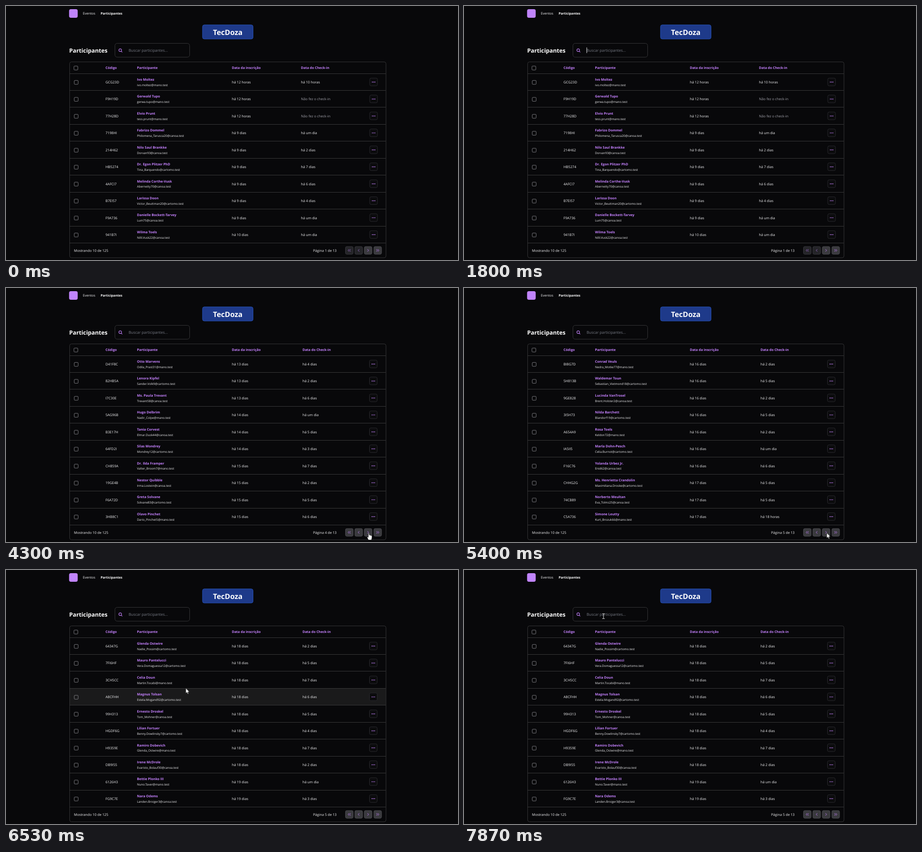
Animation, 998 px wide and 561 px high, one loop 8000 ms. Source, as an HTML page:

```html
<!DOCTYPE html>
<html lang="pt-BR">
<head>
<meta charset="utf-8">
<title>Participantes</title>
<style>
  html, body { margin: 0; width: 100%; height: 100%; overflow: hidden; background: #08080a; }
  svg { display: block; width: 998px; height: 561px; overflow: hidden; }
  text {
    font: 500 7.65px "Open Sans", "Noto Sans", sans-serif;
    fill: #f1f1f3;
    text-rendering: geometricPrecision;
    white-space: pre;
  }
  .head, .name { font-size: 7.4px; font-weight: 700; fill: #c682ff; }
  .mail { font-size: 6.55px; }
  .dim { fill: #a1a1aa; }
  .nav { font-size: 7.5px; }
  .on { font-size: 7.2px; font-weight: 700; fill: #fff; }
  .hint { font-size: 8.4px; font-weight: 400; fill: #7a7e88; }
  .h1 { font-size: 12.7px; font-weight: 700; fill: #fff; }
  .event { font-size: 16.1px; font-weight: 700; fill: #fff; text-anchor: middle; }
  .line { fill: #3a3a3b; }
  .frame { fill: none; stroke: #363638; }
  .check { fill: none; stroke: #8c8c90; stroke-width: .9; }
  .menu { fill: #0b0b0d; stroke: #2b2b2f; }
  .btn { fill: #3a3a3e; stroke: #4a4a4f; }
  .off .btn { fill: #242428; stroke: #3a3a3f; }
  .icon { fill: none; stroke: #c682ff; stroke-width: .9; stroke-linecap: round; stroke-linejoin: round; }
  .off .icon { stroke: #a571da; }
  .dots { fill: #c682ff; }

  /* Every state lives on a strip; one step of the strip shows the next state. */
  #pages, #pager, #hover, #caret, #place, #shape { animation: 8s step-end -8ms infinite; }
  #pages { animation-name: pages; }
  #pager { animation-name: pager; }
  #hover { animation-name: hover; }
  #caret { animation-name: caret; }
  #place { animation-name: place; }
  #shape { animation-name: shape; }

  @keyframes pages {
    0% { transform: translateY(0); }
    29.125% { transform: translateY(-600px); }
    42.875% { transform: translateY(-1200px); }
    57.125% { transform: translateY(-1800px); }
    70.375%, 100% { transform: translateY(-2400px); }
  }
  @keyframes pager {
    0% { transform: translateY(0); }
    25.875% { transform: translateY(-600px); }
    40.375% { transform: translateY(-1200px); }
    53.375% { transform: translateY(-1800px); }
    67.5%, 100% { transform: translateY(-2400px); }
  }
  @keyframes hover {
    0%, 9.125%, 85.63%, 100% { transform: translateY(600px); }
    6.625% { transform: translateY(299.6px); }
    8.375%, 77.69% { transform: translateY(337.05px); }
    78.53% { transform: translateY(299.6px); }
    79.09% { transform: translateY(262.15px); }
    79.68% { transform: translateY(224.7px); }
    80.3% { transform: translateY(187.25px); }
    80.93% { transform: translateY(149.8px); }
    81.54% { transform: translateY(112.35px); }
    82.5% { transform: translateY(74.9px); }
    83.63% { transform: translateY(37.45px); }
    84.63% { transform: translateY(0); }
  }
  @keyframes caret {
    0%, 23.75%, 98.375%, 100% { opacity: 0; }
    22.5%, 92.125% { opacity: 1; }
  }
  @keyframes place {
    0% { transform: translate(801px, 541px); }
    76.25% { transform: translate(801px, 541px); animation-timing-function: steps(3); }
    77.375% { transform: translate(730px, 497px); animation-timing-function: steps(2); }
    78.375% { transform: translate(624px, 430px); animation-timing-function: steps(5); }
    80.625% { transform: translate(438px, 294px); animation-timing-function: steps(2); }
    81.625% { transform: translate(397px, 261px); animation-timing-function: steps(11); }
    86.25% { transform: translate(308px, 109px); }
    88.75% { transform: translate(308px, 109px); animation-timing-function: steps(6); }
    92.125%, 100% { transform: translate(308px, 102px); }
  }
  /* 0 arrow, -2000 hand, -4000 text beam, -6000 none */
  @keyframes shape {
    0% { transform: translateX(-6000px); }
    22.875%, 26.25%, 40.375%, 53.75%, 67.875% { transform: translateX(-2000px); }
    25.875%, 40%, 53.375%, 67.5%, 76.625%, 79% { transform: translateX(0); }
    78.125%, 86.25%, 100% { transform: translateX(-4000px); }
  }
</style>
</head>
<body>
<svg viewBox="0 0 998 561" xmlns="http://www.w3.org/2000/svg">
  <rect x="139.3" y="7" width="19" height="19" rx="4" fill="#c084fc"/>
  <text class="nav" x="169.7" y="19.3">Eventos</text>
  <text class="nav on" x="209" y="19.3">Participantes</text>

  <rect x="433.9" y="41.7" width="111.6" height="31.2" rx="4" fill="#1e3a8a" stroke="#2450b4"/>
  <text class="event" x="489.7" y="63.9">TecDoza</text>

  <text class="h1" x="139.6" y="102.7">Participantes</text>
  <rect class="frame" x="240.5" y="82.5" width="165" height="30.5" rx="5"/>
  <path class="icon" style="stroke-width:1.1" d="M255.2 97.6a3 3 0 1 1-6 0a3 3 0 1 1 6 0M254.4 99.8l2 2"/>
  <text class="hint" x="270.7" y="101.3">Buscar participantes...</text>
  <rect id="caret" x="270.5" y="91.5" width="1" height="12.5" fill="#e8e8ea"/>

  <rect id="hover" x="140.5" y="149" width="698" height="37.4" fill="#1a1a1b"/>
  <rect class="frame" x="140.5" y="123.5" width="698.5" height="432.5" rx="4"/>
  <g id="grid"></g>
  <g id="pages"></g>
  <text x="150" y="542.8">Mostrando 10 de 125</text>
  <g id="pager"></g>
  <g id="next"></g>

  <g id="place"><g id="shape">
    <path transform="scale(.68)" fill="#fff" stroke="#111" stroke-width=".8"
      d="M0 0V16.5L3.8 13 6.3 19 8.8 18 6.4 12.2H11.5Z"/>
    <path transform="translate(2000)" fill="#fff" stroke="#111" stroke-width=".7" stroke-linejoin="round"
      d="M-1 1Q0-.5 1 1V5.2Q2-.1 3 5.4Q4.3 4.4 5 5.9Q6.4 5.1 7 6.8V11L5.8 15.5H-.7L-3.8 9.6Q-3.6 7.6-1 9.8Z"/>
    <path transform="translate(4000)" fill="none" stroke="#f2f2f2" stroke-width="1"
      d="M-2.7-5.5H-.6L0-5 .6-5.5H2.7M0-5V5M-2.7 5.5H-.6L0 5 .6 5.5H2.7"/>
  </g></g>
</svg>

<script>
  const TOP = 149, PITCH = 37.45, STRIP = 600;
  const hosts = { m: "mano.test", c: "canoa.test", t: "cartomo.test" };

  // code | name | mail | days since sign-up | days since check-in (h = hours)
  const people = [
`GCG23D|Ivo Moltez|ivo.moltez@m|12h|10h
F9H19D|Gerwald Tupo|gerwa.tupo@m|12h|-
77H28D|Elvio Prunt|tess.prunt@m|12h|-
7198HI|Fabrizo Dommel|Philomena_Tarusca20@c|9|1
214H62|Nilo Saul Brankke|Dorvan93@c|9|2
HB5274|Dr. Egon Plitzer PhD|Tina_Barquendo@t|9|7
4AFCI7|Melinda Corthe-Vusk|Abernetty70@c|9|6
B7EI57|Larissa Doon|Victor_Beuttman20@t|9|4
F9A736|Danielle Bockett-Tarvey|Lum75@c|9|1
941B7I|Wilma Toels|Nilli.Vusk22@c|10|1`,
`36BHC6|Thamira Drock|Wilton8@t|10|6
8G771A|Ms. Carola Nervis|Gilda.Morthelser@m|10|5
4I6IGE|Dr. Bruno Tolanek|Wendel60@m|10|7
A9359G|Dorian Leutty-Barnoll|Brent27@m|10|2
6234DI|Rudi Lowa Jr.|Philine_Dummerts@t|10|3
I6324I|Miss Valdemira Quell|Gabriel_Vond66@c|10|12h
G55E17|Leontina Brozuk|Nadia.Tovell@c|11|2
4EAHD8|Edmund Salver|Mirabel77@m|11|7
5C7FDA|Ivone Drembois|Kurt.Pesch7@t|11|7
916E36|Ingrid Wobeller Jr.|Philippa_Boettmer67@m|12|6`,
`D41F8C|Otto Marvens|Odila_Prast31@m|13|4
82HB5A|Lenora Kipfel|Sander.Volk9@t|13|2
I7C30E|Ms. Paula Trevant|Trevant58@c|13|6
5AG96B|Hugo Delbrim|Nadir_Colpe@m|14|1
B3E17H|Tania Corvest|Elmar.Dusk44@c|14|5
64FD2I|Silas Mondrey|Mondrey12@t|14|3
CH859A|Dr. Ilda Framper|Valter_Broom7@m|15|7
19GE4B|Nestor Quibble|Irma.Lostein@c|15|2
F6A72D|Greta Solvane|Solvane83@t|15|5
3HB8C1|Olavo Pinchet|Dario_Pinchet5@m|15|6`,
`BI8G7D|Conrad Veuls|Nedra_Motke77@m|16|2
5H813B|Waldemar Toun|Sebastian_Vietmond18@t|16|5
9GE828|Lucinda VanTrosel|Brent.Holster2@c|16|2
3I5H73|Nilda Barchett|Blandorf19@t|16|5
A654A9|Rosa Toels|Keldon72@m|16|2
IA5II5|Marla Dohn-Pesch|Celia.Burnot@t|16|1
F16C76|Yolanda Urbez Jr.|Enid62@c|16|6
CHHG2G|Ms. Henrietta Crandolin|Maximiliana.Droske@t|17|5
74CB89|Norberto Meultan|Eva_Tolmz25@c|17|5
C5A736|Simone Leutty|Kurt_Brozuk66@m|17|18h`,
`64347G|Glenda Ostwire|Nadie_Possim@t|18|2
7FI6HF|Mauro Pantelucci|Vera.Domaguessa12@t|18|5
3CH5CC|Celia Doun|Martin.Tocabi@m|18|7
A8CFHH|Magnus Tolsan|Estela.Mogand92@t|18|6
99H313|Ernesto Droskel|Tom_Mohner@c|18|5
HGDF6G|Lilian Fortuer|Benny.Dowlinsky7@t|18|4
H9359E|Ramiro Dobevich|Glenda_Ostwire@m|18|7
DB9I55|Irene McDrole|Evaristo_Bolauf30@c|18|2
6126H3|Bettie Plonko III|Nuno.Taver@m|19|1
FG9C7E|Nara Odems|Landen.Broiger3@c|19|3`
  ];

  const put = (id, html) => document.getElementById(id).innerHTML = html;
  const text = (x, y, s, cls = "") => `<text class="${cls}" x="${x}" y="${y}">${s}</text>`;
  const box = (x, y, size, rx, cls) =>
    `<rect class="${cls}" x="${x}" y="${y}" width="${size}" height="${size}" rx="${rx}"/>`;
  const strip = (i, html, cls = "") =>
    `<g class="${cls}" transform="translate(0 ${i * STRIP})">${html}</g>`;
  const mid = r => TOP + PITCH * r + 19;

  function ago(s) {
    if (s === "-") return "Não fez o check-in";
    if (s === "1") return "há um dia";
    return s.endsWith("h") ? `há ${parseInt(s)} horas` : `há ${s} dias`;
  }

  function row(line, r, checkX, menuX) {
    const [code, name, mail, reg, check] = line.split("|");
    const [user, host] = mail.split("@");
    const y = mid(r);
    const dots = [-2.9, 0, 2.9].map(d =>
      `<circle class="dots" cx="${menuX + 8.5 + d}" cy="${y}" r=".95"/>`).join("");
    return text(219.7, y + 3, code)
      + text(289.3, y - 3.2, name, "name")
      + text(289.3, y + 8.7, `${user}@${hosts[host]}`, "mail")
      + text(498.7, y + 3, ago(reg))
      + text(checkX, y + 3, ago(check), check === "-" ? "dim" : "")
      + box(menuX, y - 8.7, 17, 3, "menu") + dots;
  }

  function page(rows, i) {
    const checkX = i ? 654.7 : 651.3, menuX = i ? 802.5 : 803.2;
    return strip(i, text(checkX, 139.3, "Data do Check-in", "head")
      + rows.split("\n").map((line, r) => row(line, r, checkX, menuX)).join(""));
  }

  // dir is -1 for left and 1 for right; count is the number of chevrons
  function button(x, dir, count) {
    const tips = count > 1 ? [-1.6, 1.6] : [0];
    const marks = tips.map(d =>
      `<path class="icon" d="M${x + 8.5 + d - dir * 1.2} 537.4l${dir * 2.4} 2.4l${-dir * 2.4} 2.4"/>`).join("");
    return box(x, 531.3, 17, 3, "btn") + marks;
  }

  let grid = box(150, 132.7, 8.6, 1.5, "check")
    + text(219.7, 139.3, "Código", "head")
    + text(289.3, 139.3, "Participante", "head")
    + text(498.7, 139.3, "Data da inscrição", "head");
  for (let r = 0; r <= 10; r++) {
    grid += `<rect class="line" x="140.5" y="${Math.round(TOP - .5 + PITCH * r)}" width="698" height="1"/>`;
    if (r < 10) grid += box(150.7, mid(r) - 3.6, 8.6, 1.5, "check");
  }

  put("grid", grid);
  put("pages", people.map(page).join(""));
  put("pager", people.map((_, i) => strip(i,
    text(678, 542.8, `Página ${i + 1} de 13`) + button(749.5, -1, 2) + button(770.2, -1, 1),
    i ? "" : "off")).join(""));
  put("next", button(791, 1, 1) + button(812.2, 1, 2));
</script>
</body>
</html>
```
